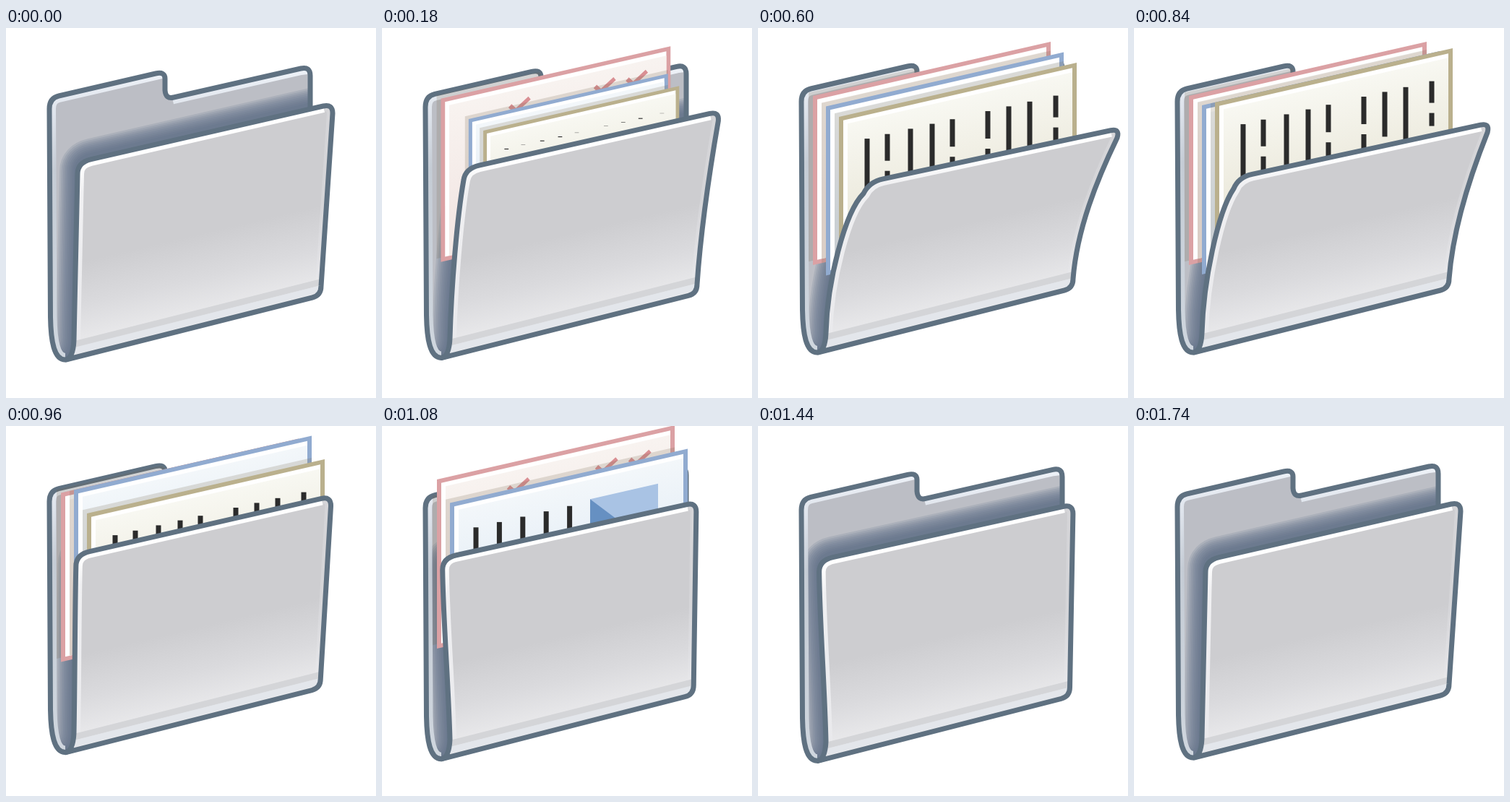
Animation, 512 px wide and 512 px high, one loop 1.8 s. Source, as an HTML page with a canvas:

```html
<!DOCTYPE html>
<html lang="en">
<head>
<meta charset="utf-8">
<title>Folder</title>
<style>
html, body { margin: 0; width: 100%; height: 100%; overflow: hidden; background: #fff; }
canvas { display: block; width: 512px; height: 512px; }
</style>
</head>
<body>
<canvas id="stage" width="512" height="512"></canvas>
<script>
const ctx = document.getElementById('stage').getContext('2d');
const STEP = 60, STEPS = 30, SLOPE = 0.228;
const EDGE = '#5f7181', INK = '#2b2b2b';
const SHEET_W = 329, SHEET_H = 234;

const clamp = (v, a = 0, b = 1) => Math.min(b, Math.max(a, v));
const mix = (a, b, k) => a + (b - a) * k;
const between = (p, q, k) => [mix(p[0], q[0], k), mix(p[1], q[1], k)];
const shift = ([x, y], dx, dy) => [x + dx, y + dy];

// Smooth step from 0 to 1, and a bump that rises and returns to 0
function ease(f, from, to) {
  const k = clamp((f - from) / (to - from));
  return k * k * (3 - 2 * k);
}
const bump = (f, from, to) => Math.sin(Math.PI * clamp((f - from) / (to - from))) ** 2;

// Motion of the folder and its sheets, by step
const bobAt = f => -10 * ease(f, 0, 9) * (1 - ease(f, 14, 20)) + 12.5 * bump(f, 16, 26);
const openAt = f => ease(f, 0, 8.3) - 2 * ease(f, 13, 18.5) + ease(f, 23, 28);
const growAt = f => mix(0.45, 1, ease(f, 0, 5)) + 0.093 * bump(f, 3, 9);
const liftAt = d => d < 0 ? -20 * ease(d, -2.4, 0) : -20 + 18 * (d / 2) ** 3;

function gradient(x0, y0, x1, y1, stops) {
  const g = ctx.createLinearGradient(x0, y0, x1, y1);
  stops.forEach(([k, color]) => g.addColorStop(k, color));
  return g;
}

function stroke(path, color, width) {
  ctx.strokeStyle = color;
  ctx.lineWidth = width;
  ctx.stroke(path);
}

function scoped(draw) {
  ctx.save();
  draw();
  ctx.restore();
}

// Front cover: squeezed at -1, closed at 0, bent open at 1
function cover(open) {
  const bend = Math.max(0, open), squeeze = Math.max(0, -open);
  const pose = (tight, closed, wide) => between(closed, open < 0 ? tight : wide, Math.abs(open));
  const topLeft = pose([83, 181], [99, 186], [154, 223]);
  const topRight = pose([434, 104], [452, 105], [501, 149]);
  const low = [436 - 5 * squeeze, 370];
  const width = topRight[0] - topLeft[0];
  const leftEnd = shift(topLeft, -8 * bend, 16);
  const topEnd = between(topRight, topLeft, 13 / width);
  const rightStart = shift(topRight, -4 * bend, 13);
  const rightEnd = shift(low, 0, -13);

  const leftTop = path => {
    path.moveTo(83, 459);
    path.quadraticCurveTo(93, 456, 94, 432);
    path.bezierCurveTo(96 - 4 * squeeze, 360, 97 - 13 * squeeze + 23 * bend, 265, ...leftEnd);
    path.quadraticCurveTo(...topLeft, ...between(topLeft, topRight, 19 / width));
    path.lineTo(...topEnd);
  };
  const right = path => {
    path.quadraticCurveTo(...topRight, ...rightStart);
    path.bezierCurveTo(
      ...shift(between(rightStart, rightEnd, 0.3), -10 * bend, 0),
      ...shift(between(rightStart, rightEnd, 0.65), -16 * bend, 0),
      ...rightEnd);
    path.quadraticCurveTo(...low, ...shift(low, -12, 3));
  };
  const full = new Path2D(), near = new Path2D(), far = new Path2D();
  leftTop(full);
  right(full);
  full.closePath();
  leftTop(near);
  far.moveTo(...topEnd);
  right(far);
  return { full, near, far };
}

const LEFT_TOP = 'M82 459C66 459 62 432 61.5 400L60 112Q60 97 73 94L207 63';
const back = new Path2D(LEFT_TOP + 'Q220 60 220 70V86Q221 99 232 96L408 56Q421 53 421 66V360Z');
const backLight = new Path2D(LEFT_TOP + 'l8 -2M230 96.5L408 56l8 -1');
const sheetArea = new Path2D('M0 0H512V190H430V512H0Z');

function drawBack(front) {
  scoped(() => {
    ctx.clip(back);
    ctx.fillStyle = '#bcbec5';
    ctx.fill(back);
    scoped(() => {
      ctx.translate(1, -3);
      for (let w = 52; w > 8; w -= 5) stroke(front.full, 'rgba(88,110,130,.17)', w);
    });
    stroke(backLight, gradient(0, 60, 0, 450, [[0, '#edf1f7'], [0.15, '#dfe4ec'], [0.35, '#c5ccd5'], [1, '#cfd6de']]), 18);
  });
  stroke(back, EDGE, 7);
}

function drawFront(front) {
  scoped(() => {
    ctx.clip(front.full);
    ctx.fillStyle = gradient(0, 348, 26.7, 461.7, [[0, '#cdcdd0'], [0.5, '#dadadd'], [1, '#ebebed']]);
    ctx.fill(front.full);
    stroke(front.far, 'rgba(235,236,240,.25)', 16);
    stroke(front.near, gradient(0, 190, 0, 440, [[0, '#fff'], [0.15, '#f0f0f2'], [1, '#e9e9ec']]), 18);
    [[18, '#d4d5d8'], [9, '#e3e6eb']].forEach(([up, color]) => {
      stroke(new Path2D(`M78 ${460 - up}L450 ${366 - up}`), color, 9);
    });
  });
  stroke(front.full, EDGE, 7);
}

// Upright bar on a slanted sheet
function bar(u, v, h) {
  scoped(() => {
    ctx.transform(1, SLOPE, 0, 1, u, v);
    ctx.fillStyle = INK;
    ctx.fillRect(-3.5, 0, 7, h);
  });
}

function ticks() {
  [127, 249, 295].forEach(u => stroke(new Path2D(`M${u} 28l-20 14l-8 -9`), '#d98f93', 6));
}

function chart() {
  for (let i = 0; i < 5; i++) bar(36 + 32.4 * i, 42, 100);
  ctx.fillStyle = '#a9c3e4';
  ctx.fillRect(194, 39, 94, 94);
  ctx.fillStyle = '#6690c2';
  ctx.fill(new Path2D('M194 39l47 46l-47 48Z'));
}

// Each column: place, and length before its break
const COLUMNS = [[39, 115], [67, 37], [99, 115], [129, 115], [157, 38], [206, 38], [235, 62], [264, 115], [300, 30]];

function columns(f) {
  COLUMNS.forEach(([u, cut]) => {
    const grown = clamp((f - 6) / 3 + 0.43 * ease(u, 90, 260), 0.012, 1);
    const next = cut + 14;
    bar(u, 39, cut * grown);
    if (next < 115) bar(u, 39 + next, (u < 300 ? 115 - next : 18) * grown);
  });
}

const SHEETS = [
  { edge: '#dba1a4', fill: ['#f8f3f0', '#f3e8e5'], art: ticks },
  { edge: '#91abd0', fill: ['#f3f7fa', '#dfeaf5'], art: chart },
  { edge: '#bab08d', fill: ['#f8f8f2', '#e9e6d7'], art: columns }
];

function drawSheet({ edge, fill, art }, i, f, under) {
  const sinceLift = f - (18 - 2 * i);
  if (f < 1 || sinceLift >= 4) return under;
  const s = growAt(f + 1 / (1 + 4 * i));
  const midU = 160, midV = 145;
  const x = 76 + 18 * i + midU * (1 - s);
  const y = 94 + 14.5 * i + liftAt(sinceLift) + (midV - SLOPE * midU) * (1 - s);
  const place = [s, -SLOPE * s, 0, s, x, y];
  const box = (u, v, w, h) => {
    const local = new Path2D(), placed = new Path2D();
    local.rect(u, v, w, h);
    placed.addPath(local, new DOMMatrix(place));
    return placed;
  };
  scoped(() => {
    ctx.clip(under);
    ctx.fillStyle = 'rgba(115,100,75,.2)';
    ctx.fill(box(-6, -6, SHEET_W + 6, SHEET_H));
  });
  scoped(() => {
    ctx.transform(...place);
    const layer = (color, left, right) => {
      ctx.fillStyle = color;
      ctx.fillRect(left, left, SHEET_W - left - right, SHEET_H - left - right);
    };
    layer(edge, 0, 0);
    layer('#fff', 6, 6);
    layer(gradient(0, 10, 0, 170, [[0, fill[0]], [1, fill[1]]]), 12, 6);
    art(f);
  });
  return box(0, 0, SHEET_W, SHEET_H);
}

function draw(f) {
  const bob = bobAt(f), front = cover(openAt(f));
  ctx.fillStyle = '#fff';
  ctx.fillRect(0, 0, 512, 512);
  ctx.lineJoin = 'round';
  scoped(() => {
    ctx.translate(0, bob);
    drawBack(front);
  });
  scoped(() => {
    ctx.clip(sheetArea);
    let under = new Path2D();
    under.addPath(back, new DOMMatrix([1, 0, 0, 1, 0, bob]));
    SHEETS.forEach((sheet, i) => { under = drawSheet(sheet, i, f, under); });
  });
  scoped(() => {
    ctx.translate(0, bob);
    drawFront(front);
  });
}

const start = performance.now();
function tick() {
  draw(Math.floor(Math.max(0, performance.now() - start) / STEP) % STEPS);
  requestAnimationFrame(tick);
}
tick();
</script>
</body>
</html>
```
